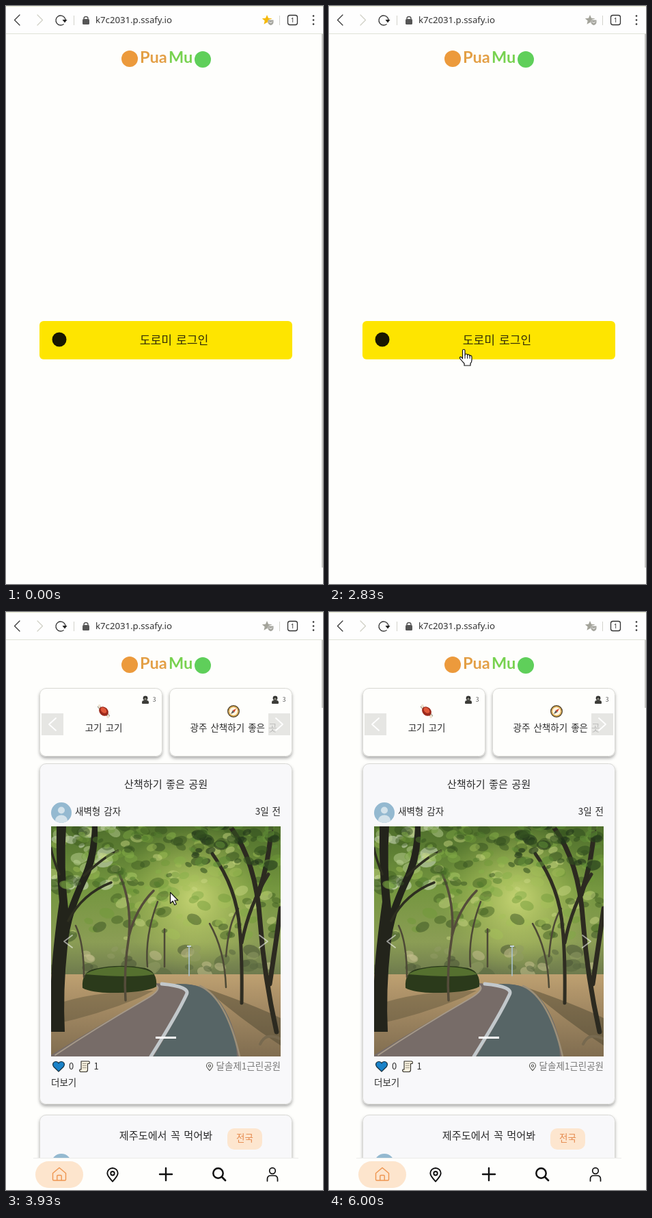
An HTML page with a canvas for the animation above (6.03 s loop, 464 by 844 pixels).

```html
<!DOCTYPE html>
<html lang="ko">
<head>
<meta charset="utf-8">
<title>Login and feed</title>
<style>
html, body { margin: 0; width: 100%; height: 100%; overflow: hidden; background: #fefefc; }
canvas { display: block; width: 464px; height: 844px; }
</style>
</head>
<body>
<canvas id="stage"></canvas>
<script>
const W = 464, H = 844, LOOP = 6030;
const STAR_OFF = 2440, FEED_AT = 2980, PHOTO_AT = 3520;
const KR = '"Noto Sans CJK KR", "Noto Sans CJK", "Noto Sans", sans-serif';
const PAGE = '#fefefc', CARD = '#f8f8fa', INK = '#2b2b2b';

const canvas = document.getElementById('stage');
const dpr = window.devicePixelRatio || 1;
canvas.width = W * dpr;
canvas.height = H * dpr;
let c = canvas.getContext('2d');

// ---- helpers ----
function rect(x, y, w, h, fill) {
  c.fillStyle = fill;
  c.fillRect(x, y, w, h);
}
function paint(fill, stroke, lw = 1) {
  if (fill) { c.fillStyle = fill; c.fill(); }
  if (stroke) { c.strokeStyle = stroke; c.lineWidth = lw; c.stroke(); }
}
function round(x, y, w, h, r, fill, stroke, lw) {
  c.beginPath();
  c.roundRect(x, y, w, h, r);
  paint(fill, stroke, lw);
}
function disc(x, y, r, fill, stroke, lw) {
  c.beginPath();
  c.arc(x, y, r, 0, Math.PI * 2);
  paint(fill, stroke, lw);
}
function oval(x, y, rx, ry, fill, turn = 0) {
  c.beginPath();
  c.ellipse(x, y, rx, ry, turn, 0, Math.PI * 2);
  paint(fill);
}
function line(pts, color, lw = 1) {
  c.beginPath();
  for (let i = 0; i < pts.length; i += 2) c.lineTo(pts[i], pts[i + 1]);
  paint(null, color, lw);
}
function shape(d, x, y, fill, stroke, lw = 1) {
  c.save();
  c.translate(x, y);
  const p = new Path2D(d);
  if (fill) { c.fillStyle = fill; c.fill(p); }
  if (stroke) { c.strokeStyle = stroke; c.lineWidth = lw; c.stroke(p); }
  c.restore();
}
function label(s, x, y, size, color = INK, align = 'left', family = KR, weight = 400) {
  c.font = `${weight} ${size}px ${family}`;
  c.textAlign = align;
  c.fillStyle = color;
  c.wordSpacing = family === KR ? '2px' : '0px';
  c.fillText(s, x, y + size * 0.37);
}

// ---- browser bar ----
function bar(t) {
  rect(0, 0, W, 40, '#fefefe');
  rect(0, 0, W, 1, '#e6ead0');
  rect(0, 40, W, 1, '#dfe2d8');
  line([20, 13, 12.5, 20.5, 20, 28], '#333', 1.2);
  line([46, 13, 53.5, 20.5, 46, 28], '#cfcfc4', 1.2);
  c.beginPath();
  c.arc(80, 21, 7, 0.95, Math.PI * 2);
  paint(null, '#333', 1.3);
  shape('M-3.5 0H3.5L0 4.5Z', 86, 20, '#222');
  rect(99, 14, 1, 14, '#d3d3cc');
  rect(400, 14, 1, 14, '#d3d3cc');
  round(112, 19, 10, 8, 1.5, '#555');
  c.beginPath();
  c.arc(117, 18.5, 3, Math.PI, 0);
  paint(null, '#555', 1.5);
  label('k7c2031.p.ssafy.io', 131, 20.5, 13.2, '#333', 'left', '"Noto Sans", "Open Sans", sans-serif');

  c.beginPath();
  for (let i = 0; i < 10; i++) {
    const r = i % 2 ? 3.5 : 7.6, a = i * Math.PI / 5 - Math.PI / 2;
    c.lineTo(382 + r * Math.cos(a), 20.5 + r * Math.sin(a));
  }
  c.closePath();
  paint(t < STAR_OFF ? '#f5b90a' : '#a3a39a');
  disc(387.5, 23.8, 4.6, '#fefefe');
  shape('M-4 -3H4V0.5Q3.5 3.5 0 4.5Q-3.5 3.5 -4 0.5Z', 387.5, 23.5, '#a5a59e');
  line([385.6, 23, 387.5, 25, 389.4, 23], '#fefefe', 1);

  round(412.5, 13.5, 14, 14, 3, null, '#333', 1.3);
  label('1', 419.5, 20.5, 9.5, '#333', 'center', '"Noto Sans", sans-serif');
  for (const y of [14.5, 20.5, 26.5]) disc(450, y, 1.3, '#333');
}

function brand() {
  const f = 'Lato, "Noto Sans", sans-serif';
  disc(181, 77, 12, '#ec9a3c');
  disc(288, 78, 12, '#5fcf5a');
  label('Pua', 196, 74.5, 23.5, '#e39f45', 'left', f, 700);
  label('Mu', 238, 74.5, 23.5, '#78d250', 'left', f, 700);
}

// ---- login ----
function login() {
  round(49, 460, 370, 56, 6, '#fee500');
  disc(78, 487, 10.5, '#191700');
  label('도로미 로그인', 246, 488, 17.2, '#332f08', 'center');
  rect(462, 41, 2, 779, '#c8c8c4');
}

// ---- feed ----
function panel(x, y, w, h, fill) {
  c.save();
  c.shadowColor = 'rgba(60,60,60,.4)';
  c.shadowBlur = 4 * dpr;
  c.shadowOffsetY = 3 * dpr;
  round(x, y, w, h, 9, fill);
  c.restore();
  round(x + .5, y + .5, w - 1, h - 1, 9, null, '#dadad6');
}

function person(x, y) {
  disc(x, y - 2.2, 3.4, '#2f2f2c');
  round(x - 5, y + 1, 10, 5, [3, 3, 1, 1], '#3d3d39');
  disc(x, y - 1, 1.7, '#85857c');
  label('3', x + 13, y, 8.5, '#555', 'center');
}

function meat(x, y) {
  c.save();
  c.translate(x, y);
  c.rotate(0.75);
  round(-11, -1.5, 22, 3, 1.5, '#efe5d4', '#554', .7);
  disc(-10, -1.7, 2, '#efe5d4');
  disc(10, 1.7, 2, '#efe5d4');
  oval(0, 0, 7.6, 6, '#9c2a1c');
  oval(-1, -1, 5, 3.4, '#e0583a');
  c.restore();
}

function compass(x, y) {
  disc(x, y, 8.3, '#fff6e2', '#4b3b20', 1.4);
  disc(x, y, 6.7, null, '#d9a544', 1.4);
  shape('M4 -4L1.3 1.3L-1.3 -1.3Z', x, y, '#d3402a');
  shape('M-4 4L1.3 1.3L-1.3 -1.3Z', x, y, '#555');
}

function pager(x, dir) {
  rect(x, 148, 32, 32, 'rgba(224,224,222,.8)');
  line([x + 16 + 5 * dir, 155, x + 16 - 5 * dir, 164, x + 16 + 5 * dir, 173], '#fff', 1.8);
}

function themes() {
  panel(49, 111, 180, 100, PAGE);
  panel(239, 111, 180, 100, PAGE);
  person(204, 128);
  person(394, 128);
  meat(143, 145);
  compass(333, 145);
  label('고기 고기', 143, 169, 13.5, INK, 'center');
  label('광주 산책하기 좋은 곳', 333, 169, 13.5, INK, 'center');
  pager(52, 1);
  pager(384, -1);
}

function pin(x, y, s, color, lw) {
  c.save();
  c.translate(x, y);
  c.scale(s, s);
  shape('M0 6C-3.2 2.6 -4.8 .6 -4.8 -1.5A4.8 4.8 0 0 1 4.8 -1.5C4.8 .6 3.2 2.6 0 6Z', 0, 0, null, color, lw);
  disc(0, -1.4, 1.7, null, color, lw);
  c.restore();
}

function paper(x, y) {
  shape('M-5 -7.5H6Q8 -7 7 -4H4.5V5Q4.5 8 2 8H-6Q-8 7 -7 4.5H-5Z', x, y, '#f7f0de', '#2e2c26', 1.1);
  for (const dy of [-4, -1, 2]) line([x - 3, y + dy, x + 2.5, y + dy], '#948e7e', .9);
}

function avatar(x, y) {
  c.save();
  c.beginPath();
  c.arc(x, y, 15, 0, Math.PI * 2);
  c.clip();
  rect(x - 15, y - 15, 30, 30, '#94b9d0');
  disc(x, y - 3.5, 5, '#d3e2ea');
  oval(x, y + 11, 9, 7.5, '#d3e2ea');
  c.restore();
}

function post(y, [title, place, pinX, likes, notes], photo) {
  const d = photo ? 312 : 0;
  panel(49, y, 370, 186 + d, CARD);
  label(title, 234, y + 30, 15.2, INK, 'center');
  avatar(81, y + 72);
  label('새벽형 감자', 101, y + 70.5, 13.5);
  label('3일 전', 402, y + 70.5, 13.5, INK, 'right');
  if (photo) {
    c.drawImage(park, 66, y + 92, 336, 336);
    line([97, y + 251, 85, y + 260, 97, y + 269], 'rgba(255,255,255,.55)', 1.8);
    line([371, y + 251, 383, y + 260, 371, y + 269], 'rgba(255,255,255,.55)', 1.8);
  }
  rect(219, y + 87 + d, 30, 3, '#fefefe');
  const f = y + 130 + d;
  shape('M0 7.5L-7.5 .2C-10 -3 -7.5 -7 -4.2 -7C-2 -7 -.7 -6 0 -4.5C.7 -6 2 -7 4.2 -7C7.5 -7 10 -3 7.5 .2Z', 77, f + .5, '#1a82c8', '#17303f', 1.2);
  label(likes, 95.5, f, 13, INK, 'center');
  paper(115, f + .5);
  label(notes, 132, f, 13, INK, 'center');
  pin(pinX, f + 1, .95, '#55554f', 1.1);
  label(place, 402, f + .5, 13.5, '#777', 'right');
  label('더보기', 66, f + 24, 13.5);
}

const POSTS = [
  ['산책하기 좋은 공원', '달솔제1근린공원', 298, '0', '1'],
  ['제주도에서 꼭 먹어봐', '미루담 본점', 328, '1', '0'],
  ['제주도에서 꼭 먹어봐', '두씨네구름국수', 306, '0', '0']
];

function tabs() {
  round(324, 754, 51, 31, 10, 'rgba(253,229,205,.95)');
  label('전국', 349.5, 768, 13.5, '#e58a4e', 'center');
  rect(0, 797, 462, 47, PAGE);
  rect(40, 797, 388, 1, '#ececea');
  round(43, 802, 70, 39, 19.5, '#fde5cd');
  shape('M-9.5 -1.5L0 -9.5L9.5 -1.5V7.5Q9.5 9 8 9H-8Q-9.5 9 -9.5 7.5ZM-3.2 9V2.5Q-3.2 1.5 -2 1.5H2Q3.2 1.5 3.2 2.5V9', 78, 821, null, '#ee9550', 1.4);
  pin(156, 822, 1.6, '#111', 1.2);
  line([225, 821, 243, 821], '#111', 2.4);
  line([234, 812, 234, 830], '#111', 2.4);
  disc(310.5, 819.5, 7.2, null, '#111', 2.5);
  line([316, 825, 321, 830], '#111', 2.8);
  disc(390, 816, 4.3, null, '#111', 1.7);
  shape('M-7.5 9V6Q-7.5 1 -2.5 1H2.5Q7.5 1 7.5 6V9', 390, 822, null, '#111', 1.7);
}

function feed(t) {
  const loaded = t >= PHOTO_AT;
  themes();
  let y = 221;
  for (const p of POSTS) {
    if (y < 797) post(y, p, loaded);
    y += loaded ? 513 : 201;
  }
  tabs();
  rect(462, 41, 2, loaded ? 99 : 186, '#c8c8c4');
}

// ---- park picture, drawn once ----
function makePark() {
  const cv = document.createElement('canvas');
  cv.width = cv.height = 336;
  const main = c;
  c = cv.getContext('2d');
  c.lineCap = 'round';
  let seed = 11;
  const rnd = () => (seed = (seed * 16807) % 2147483647) / 2147483647;
  // soft leaf dabs scattered over a box
  const leaves = (n, x, y, w, h, size, tones, alpha) => {
    c.globalAlpha = alpha;
    for (let i = 0; i < n; i++) {
      const r = size * (.5 + rnd());
      oval(x + rnd() * w, y + rnd() * h, r * 1.5, r, tones[i % tones.length], rnd() - .5);
    }
    c.globalAlpha = 1;
  };

  const sky = c.createLinearGradient(0, 0, 0, 225);
  sky.addColorStop(0, '#4f6f2c');
  sky.addColorStop(.4, '#74963f');
  sky.addColorStop(.75, '#8b9d55');
  sky.addColorStop(1, '#69744c');
  rect(0, 0, 336, 225, sky);
  const glow = c.createRadialGradient(210, 105, 5, 210, 105, 110);
  glow.addColorStop(0, 'rgba(205,218,120,.85)');
  glow.addColorStop(1, 'rgba(180,200,90,0)');
  rect(0, 0, 336, 225, glow);

  leaves(26, 0, 0, 100, 90, 6, ['#dce6d0', '#b9cf92'], .5);
  leaves(170, 0, 0, 336, 165, 5, ['#3b5a20', '#6f9a38', '#a4c258', '#2f4a1c', '#7fa844', '#cbda86'], .45);
  leaves(36, 0, 178, 336, 38, 6, ['#59683f', '#c3bd8c', '#4a5636', '#8f9a63'], .55);

  const land = c.createLinearGradient(0, 212, 0, 336);
  land.addColorStop(0, '#c0a272');
  land.addColorStop(.4, '#a58b64');
  land.addColorStop(1, '#806d50');
  rect(0, 216, 336, 120, land);
  shape('M0 262Q60 240 150 240L130 250Q70 275 0 290Z', 0, 0, 'rgba(84,76,52,.4)');
  shape('M225 236Q300 262 336 280V320Q275 280 225 236Z', 0, 0, 'rgba(70,64,46,.45)');

  shape('M150 229Q168 236 140 252Q70 290 0 334V336H275Q270 285 242 250Q222 230 196 231Z', 0, 0, '#776c68');
  shape('M175 230Q205 234 200 245Q190 270 150 336H272Q270 285 242 250Q222 230 190 230Z', 0, 0, '#576566');
  shape('M162 230Q205 234 198 246Q185 274 146 336', 0, 0, null, '#c2c8cb', 5);
  shape('M150 231Q168 236 136 254Q66 294 6 334', 0, 0, null, '#a69a8a', 2);
  shape('M218 233Q256 250 276 336', 0, 0, null, '#9c8f78', 2.5);

  shape('M46 236Q44 212 64 208Q100 200 138 207Q156 212 154 234Q140 242 98 243Q60 244 46 236Z', 0, 0, '#2b3a1b');
  shape('M50 216Q66 206 100 205Q138 205 151 216Q120 222 50 216Z', 0, 0, '#55702f');

  const bark = '#23241b';
  shape('M0 300H20Q17 240 24 176Q28 126 58 68Q70 34 68 0H60Q58 46 42 78Q30 105 25 120Q18 60 22 0H8Q7 60 12 110Q2 180 0 226Z', 0, 0, bark);
  shape('M25 138Q46 98 88 82M12 70Q2 45 0 32M48 72Q80 42 98 36', 0, 0, null, '#2d2e20', 3.5);
  shape('M109 254Q106 210 114 160Q118 110 100 70M114 160Q124 120 150 94', 0, 0, null, '#544c3a', 3.5);
  shape('M48 220Q48 170 36 145M141 205Q137 160 156 110M256 235Q254 180 232 142M256 190Q260 140 274 120M166 205V150', 0, 0, null, '#4d4936', 2.5);
  shape('M279 258Q280 190 276 150Q272 90 236 40M279 170Q290 115 318 70', 0, 0, null, '#2f2d22', 5);
  shape('M330 300Q312 220 306 140Q300 50 262 0M320 230Q332 150 336 120M303 100Q320 50 322 0', 0, 0, null, '#2c2a20', 7);
  shape('M335 310Q314 300 306 318', 0, 0, null, '#77694f', 4);
  line([202, 175, 202, 218], '#a9c3d0', 1.6);
  rect(199, 174, 6, 2, '#c6d5dc');

  leaves(60, 190, -5, 150, 70, 5, ['#22361a', '#34521f', '#5d8a35'], .6);
  leaves(45, 20, -5, 180, 100, 4.5, ['#35521f', '#86b048', '#4f7a2c'], .5);
  c.globalAlpha = 1;
  c = main;
  return cv;
}

// ---- pointer ----
const PATH = [
  [1130, 42, 850], [1230, 60, 750], [1470, 115, 608], [1850, 170, 504], [2300, 197, 502],
  [3500, 197, 502], [3930, 240, 409], [4370, 255, 565], [4650, 290, 850]
];

function pointer(t) {
  const i = PATH.findIndex(p => p[0] > t);
  if (i < 1) return;
  const [t0, x0, y0] = PATH[i - 1], [t1, x1, y1] = PATH[i];
  const k = (t - t0) / (t1 - t0);
  const x = Math.round(x0 + (x1 - x0) * k), y = Math.round(y0 + (y1 - y0) * k);
  const hand = t < PHOTO_AT && y < 516;
  if (hand) {
    shape('M-1.5 13V1Q-1.5 -.5 .3 -.5Q2 -.5 2 1V8Q2 6 4 6Q5.5 6 5.5 8Q6 6.7 7.5 7Q9 7.3 9 9Q10 8 11 8.6Q12 9 12 11V15Q12 18 10 20V23H1V20Q-2 17 -5.5 12.5Q-6 10.5 -4.3 10.3Q-3 10.3 -1.5 13Z', x, y, '#fff', '#111', 1.2);
    for (const dx of [2, 5.5, 9]) line([x + dx, y + 8, x + dx, y + 12.5], '#111', 1);
  } else {
    shape('M.5 .5V16.5L4.2 13L6.8 18.8L9.4 17.6L6.8 12H11.8Z', x, y, '#fff', '#111', 1.1);
  }
}

const park = makePark();

function draw(t) {
  c.setTransform(dpr, 0, 0, dpr, 0, 0);
  c.lineCap = 'round';
  c.lineJoin = 'round';
  rect(0, 0, W, H, PAGE);
  brand();
  if (t < FEED_AT) login(); else feed(t);
  bar(t);
  pointer(t);
}

const start = performance.now();
function tick() {
  draw((performance.now() - start) % LOOP);
  requestAnimationFrame(tick);
}
tick();
</script>
</body>
</html>
```
